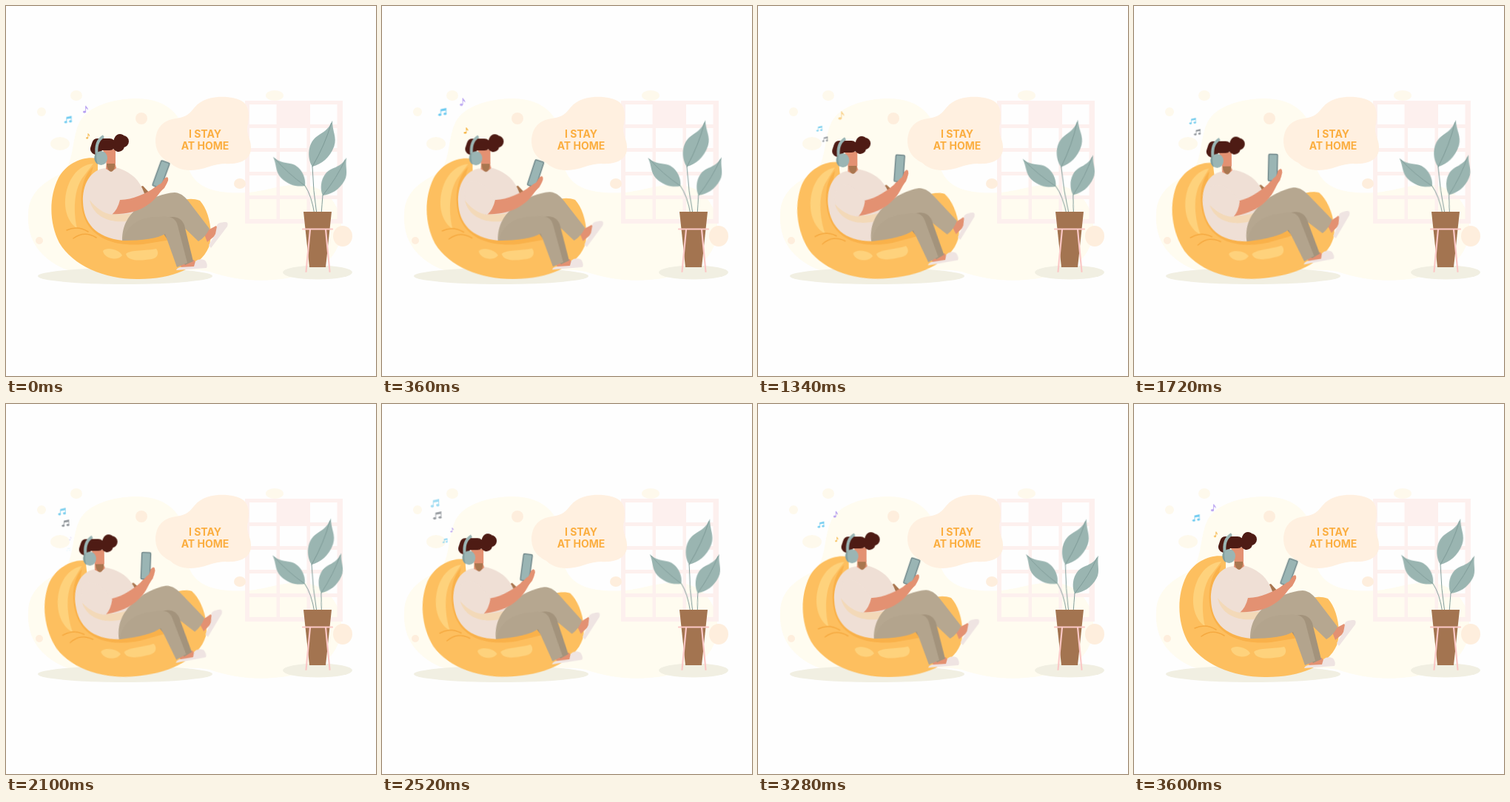
Write an HTML page that moves like this. It is 500 px wide and 500 px high and loops after 3.62 s.

```html
<!DOCTYPE html>
<html lang="en">
<head>
<meta charset="utf-8">
<title>I stay at home</title>
<style>
  html, body { margin: 0; width: 100%; height: 100%; overflow: hidden; background: #fefefe; }
  svg { display: block; width: 100vw; height: 100vh; }
  text { font: 700 14px Inter, "Open Sans", sans-serif; fill: #fbae40; text-anchor: middle; }

  .sway { animation: turn 1810ms cubic-bezier(.37, 0, .63, 1) infinite alternate; }
  @keyframes turn {
    from { transform: rotate(var(--from, 0deg)); }
    to { transform: rotate(var(--to)); }
  }
  .rocker { --to: -6.8deg; transform-origin: 165px 357px; }
  .head { --to: 6.4deg; transform-origin: 142px 220px; }
  .arm { --to: -5deg; transform-origin: 143px 272px; }
  .phone { --to: -7deg; transform-origin: 208px 240px; }
  .plant { transform-origin: 420px 278px; animation-delay: -670ms; }
  .top { --from: 1.8deg; --to: -4.2deg; }
  .left { --from: 1.4deg; --to: -2.6deg; }
  .right { --from: .2deg; --to: -6deg; animation-delay: -120ms; }

  .stem { fill: none; stroke: #7f9b98; stroke-linecap: round; }
  .skin { fill: #e39172; }
  .shade { fill: #a9764f; }
  .shoe { fill: #efe4e2; }
  .shirt { fill: #efdfd5; }
  .fold { fill: #f3d9b8; }
  .hair { fill: none; stroke: #4e1b14; stroke-width: 16; stroke-linecap: round; stroke-linejoin: round; }
  .band { fill: none; stroke: #9ab5b4; stroke-width: 4; }
  .glow { fill: #fed27c; }
</style>
</head>
<body>
<svg viewBox="0 0 500 500">
  <defs>
    <g id="single">
      <ellipse cx="-1.500" cy="4" rx="2.400" ry="1.800"/>
      <path d="M0 4V-6H1C2 -3 5 -3 4 1C3 -1 2 -2 1 -2V4Z"/>
    </g>
    <g id="double">
      <ellipse cx="-4" cy="4.400" rx="2.400" ry="1.900"/>
      <ellipse cx="4" cy="3" rx="2.400" ry="1.900"/>
      <path d="M-3 4V-4L6 -6V3H5V-2L-2 -1V4Z"/>
    </g>
    <g id="leaf">
      <path fill="#9ab5b1" d="M0 0C-12 -8 -19 -28 -10 -41C-5 -49 0 -54 0 -68C5 -55 15 -50 16 -37C17 -20 10 -8 0 0Z"/>
      <path class="stem" d="M0 0Q4 -35 0 -64"/>
    </g>
    <pattern id="bars" x="329" y="133" width="41" height="32" patternUnits="userSpaceOnUse">
      <path stroke="#fdf0ee" stroke-width="5" d="M39 0V32M0 29.500H41"/>
    </pattern>
  </defs>

  <path fill="#fffcf0" d="M98 160C108 135 145 125 178 125C222 126 240 152 242 180
    C242 222 250 248 300 252C345 256 370 238 405 242C437 246 456 275 453 306
    C450 342 420 362 385 367C345 374 310 371 275 359C220 348 120 378 72 352
    C42 336 28 312 30 280C31 250 55 236 75 226C92 214 88 184 98 160Z"/>

  <g fill="#fef9ec">
    <ellipse cx="95" cy="121" rx="8" ry="7"/>
    <circle cx="48" cy="143" r="6"/>
    <ellipse cx="73" cy="186" rx="13" ry="9"/>
    <ellipse cx="363" cy="121" rx="12" ry="7"/>
  </g>

  <rect x="325.500" y="130.500" width="127" height="161" fill="url(#bars)" stroke="#fdf0ee" stroke-width="5"/>
  <rect x="368" y="130" width="42" height="35" fill="#fdf0ee"/>

  <path fill="#fff0e0" d="M202 184C202 165 212 154 230 152C252 149 250 138 263 130
    C278 120 308 121 321 130C331 139 328 153 326 165C326 177 332 182 331 194
    C329 211 311 214 296 213C279 213 268 222 250 222C236 222 227 217 222 212
    C210 206 203 198 202 184Z"/>
  <g fill="#feeedd">
    <circle cx="183" cy="152" r="8"/>
    <ellipse cx="316" cy="240" rx="8" ry="7"/>
    <ellipse cx="455" cy="311" rx="13" ry="14"/>
    <circle cx="45" cy="317" r="5"/>
  </g>
  <text x="269" y="178">I STAY</text>
  <text x="269" y="194">AT HOME</text>

  <g fill="#f1efe2">
    <ellipse cx="161" cy="365" rx="118" ry="11"/>
    <ellipse cx="421" cy="360" rx="47" ry="9.500"/>
  </g>

  <g class="sway plant top">
    <path class="stem" d="M414 217Q415 250 420 282"/>
    <use href="#leaf" transform="translate(414 217) rotate(23.500)"/>
  </g>
  <g class="sway plant left">
    <path class="stem" d="M404 243Q413 256 417 282"/>
    <use href="#leaf" transform="translate(404 243) rotate(-48) scale(-.86 .86)"/>
  </g>
  <g class="sway plant right">
    <path class="stem" d="M428 256Q427 268 426 282"/>
    <use href="#leaf" transform="translate(428 256) rotate(32) scale(.89)"/>
  </g>
  <path fill="#a37450" d="M402 278H440L432 353H410Z"/>
  <path fill="none" stroke="#fbc8c6" stroke-width="2.200" stroke-linecap="round"
    d="M401 301.500H441M411 302L405.500 359M432 302L437.500 359"/>

  <g class="sway rocker">
    <path fill="#fdbf5f" d="M124 206C105 202 82 212 71 232C57 260 59 295 72 320
      C91 352 136 370 180 369C224 369 262 354 274 326C281 306 274 276 262 263
      C240 255 220 270 200 290L124 290Z"/>
    <path class="glow" d="M118 213C96 215 82 236 80 262C79 281 87 295 96 300C91 279 91 247 105 230Z"/>
    <path fill="#f9b14a" d="M118 217C100 232 97 268 108 291C121 316 150 325 185 322
      L222 316L215 300L140 305C112 290 105 255 118 217Z"/>
    <path fill="none" stroke="#f5a940" stroke-width="1.500" stroke-linecap="round"
      d="M82 303Q97 296 111 305M91 314Q106 303 122 313"/>
    <path class="glow" d="M131 331C136 325 153 329 157 337C151 345 133 342 131 331Z"/>
    <path class="glow" d="M162 335C168 329 191 331 203 328C208 334 204 341 197 342C183 344 165 346 162 335Z"/>

    <path class="shade" d="M174 247L185 243L198 257L186 266Z"/>
    <path class="shirt" d="M136 219C113 220 103 243 104 265C105 292 120 313 158 317
      L196 275L184 246C177 231 164 222 148 218Z"/>
    <path class="fold" d="M113 262C125 280 150 285 176 279L162 291C140 293 118 285 113 262Z"/>
    <path class="skin" d="M136 210H147L149 219Q142 226 135 220Z"/>

    <path class="skin" d="M267 306L284 297L289 305L272 319Z"/>
    <path class="shoe" d="M285 298C284 294 290 292 297 292Q301 292 299 298L277 327L274 323L283 308Z"/>
    <path class="skin" d="M234 347L254 343L259 352L238 355Z"/>
    <path class="shoe" d="M256 345C261 341 268 342 270 345Q273 351 271 354L230 357Q231 354 235 353L254 352Z"/>
    <path fill="#b6a790" d="M157 317C157 295 166 282 182 269C196 259 213 253 228 252
      C238 253 243 259 249 267L275 301Q269 313 260 318L233 292L190 314Z"/>
    <path fill="#a3937c" d="M206 298C214 282 235 280 241 296L253 345L242 350Z"/>
    <path fill="#b3a48d" d="M158 317C163 298 178 286 200 285C217 284 229 283 232 297
      L245 347L231 353L215 308C205 314 185 317 158 317Z"/>

    <g class="sway arm">
      <path class="skin" d="M147 261C163 265 188 255 201 245L204 238L218 231Q220 235 216 242
        L208 252C197 268 178 283 140 281Z"/>
      <g class="sway phone">
        <rect x="203.500" y="209.500" width="12" height="36" rx="1.500" transform="rotate(20 209.500 227.500)"
          fill="#9ab5b4" stroke="#71888a" stroke-width="1.500"/>
      </g>
      <path class="skin" d="M199 247L207 241C212 240 211 235 216 232Q220 231 219 236L214 246L204 255Z"/>
    </g>
    <path class="shirt" d="M117 239C123 233 136 237 143 246L154 262Q151 275 143 282C130 280 115 269 113 255Z"/>

    <g class="sway head">
      <path class="skin" d="M131 194H148V213Q144 217 136 214Z"/>
      <path class="shade" d="M136 213H147Q148 222 142 224Q136 222 136 213Z"/>
      <path class="hair" d="M122 193L124 187L140 187M154 181L152 189M158 183h0"/>
      <path class="band" d="M123 203C121 191 123 181 132 176"/>
      <ellipse cx="128.500" cy="205.500" rx="8.500" ry="9.500" fill="#9ab5b4"/>
      <path fill="#829f9e" d="M123 198C118 201 118 210 124 214Q121 205 123 198Z"/>
    </g>
  </g>

  <g id="notes"></g>
</svg>
<script>
  const LOOP = 3620, LIFE = 2600, STEPS = 16;

  // Each note drifts by (dx, dy) over its life, bowing sideways on the way.
  const notes = [
    { kind: "double", color: "#6ccaf0", born: 2050, x: 84, y: 198, dx: -8, dy: -74, bow: 5 },
    { kind: "double", color: "#7fd0ee", born: 400, x: 92, y: 191, dx: -25, dy: -70, bow: 0 },
    { kind: "double", color: "#92979c", born: 500, x: 102, y: 201, dx: -35, dy: -65, bow: 0 },
    { kind: "single", color: "#b39bf0", born: 1950, x: 84, y: 186, dx: 25, dy: -72, bow: 8 },
    { kind: "single", color: "#f4ae35", born: 2700, x: 97, y: 195, dx: 13, dy: -54, bow: 10 }
  ];

  const pose = ({ x, y, dx, dy, bow }, u) => ({
    offset: u * LIFE / LOOP,
    transform: `translate(${x + dx * u + bow * Math.sin(Math.PI * u)}px, ${y + dy * u}px) scale(${0.4 + 0.65 * u})`,
    opacity: Math.min(1, u * 5, (1 - u) * 4)
  });

  for (const note of notes) {
    const el = document.createElementNS("http://www.w3.org/2000/svg", "use");
    el.setAttribute("href", "#" + note.kind);
    el.setAttribute("fill", note.color);
    document.getElementById("notes").append(el);

    const frames = Array.from({ length: STEPS + 1 }, (_, i) => pose(note, i / STEPS));
    frames.push({ ...frames[STEPS], offset: 1 });
    el.animate(frames, { duration: LOOP, iterations: Infinity, delay: note.born - 2 * LOOP });
  }
</script>
</body>
</html>
```
